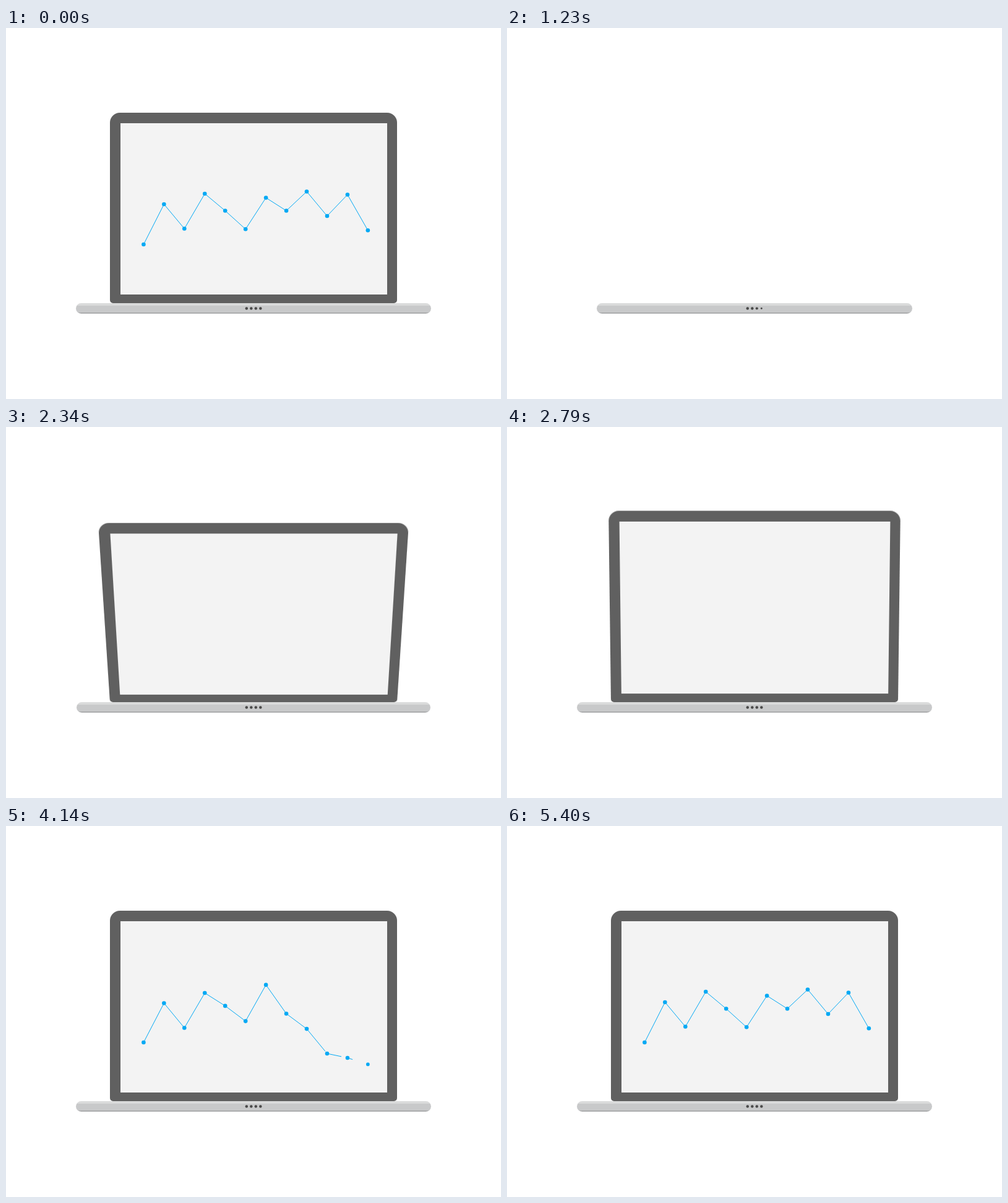
Animation, 800 px wide and 600 px high, one loop 5430 ms. Source, as an HTML page:

```html
<!DOCTYPE html>
<html lang="en">
<head>
<meta charset="utf-8">
<title>Laptop with line chart</title>
<style>
  html, body { margin: 0; width: 100%; height: 100%; overflow: hidden; background: #fff; }
  #stage {
    position: relative; width: 800px; height: 600px; overflow: hidden;
    perspective: 1725px; perspective-origin: 400px 300px;
  }
  #lid {
    position: absolute; left: 168px; top: 137px; width: 464px; height: 308px;
    background: #606060; border-radius: 16px 16px 5px 5px;
    transform-origin: 50% 100%;
  }
  #screen { position: absolute; left: 16.5px; top: 17px; width: 431px; height: 276.5px; background: #f3f3f3; }
  #base {
    position: absolute; top: 444.5px; height: 17.5px; border-radius: 8.5px;
    background: linear-gradient(#dadbdb 4px, #c8c9ca 4px, #c8c9ca 14.5px, #acadae 14.5px);
  }
  svg { position: absolute; left: 0; top: 0; }
  #ports { fill: #4a4a4a; }
  #lines { stroke: #03a9f4; stroke-width: 1; }
  #dots { fill: #03a9f4; }
</style>
</head>
<body>
<div id="stage">
  <div id="lid"><div id="screen"></div></div>
  <div id="base"></div>
  <svg width="800" height="600">
    <g id="ports"></g>
    <g id="lines"></g>
    <g id="dots"></g>
  </svg>
</div>
<script>
const LOOP = 5430, HOLD = 600, STEP = 30, STAGGER = 90;
const BASE_START = 593, PORT_START = 918, LID_START = 1972, CHART_START = 3060;
const FLOOR = 388;
const heights = [350, 285, 324.5, 268, 295.5, 325.3, 274.5, 295.5, 264.5, 304, 269.5, 327.3];

// Curves sampled once per stagger interval
const rise = [0, .042, .11, .238, .485, .913, 1.155, 1.155, 1.05, .983, .969, .985, 1, 1.003, 1];
const grow = [0, 0, .25, .7, .91, .98, 1];

const $ = id => document.getElementById(id);

function add(parent, tag) {
  const el = document.createElementNS('http://www.w3.org/2000/svg', tag);
  return $(parent).appendChild(el);
}

function set(el, attrs) {
  for (const k in attrs) el.setAttribute(k, attrs[k]);
}

const ports = [0, 1, 2, 3].map(() => add('ports', 'circle'));
const dots = heights.map(() => add('dots', 'circle'));
const lines = heights.slice(1).map(() => add('lines', 'line'));

// Catmull-Rom through evenly spaced samples
function sample(curve, age) {
  const x = age / STAGGER, last = curve.length - 1;
  if (x <= 0) return curve[0];
  if (x >= last) return curve[last];
  const i = Math.floor(x), f = x - i;
  const [a, b, c, d] = [-1, 0, 1, 2].map(o => curve[Math.min(last, Math.max(0, i + o))]);
  return b + f / 2 * (c - a + f * (2 * a - 5 * b + 4 * c - d + f * (3 * (b - c) + d - a)));
}

// Exponential ease-out over two seconds
const expoOut = age => age <= 0 ? 0 : age >= 2000 ? 1 : 1 - 2 ** (-age / 200);

// Quick pop for circles
const pop = age => age <= -10 ? 0 : 1 - Math.exp(-(age + 10) / 50);

function draw(t) {
  const half = 287 * expoOut(t - BASE_START);
  $('base').style.left = 400 - half + 'px';
  $('base').style.width = 2 * half + 'px';

  ports.forEach((p, i) => set(p, {
    cx: 388.8 + 7.5 * i, cy: 453.5, r: 2.25 * pop(t - PORT_START - STAGGER * i)
  }));

  const angle = 90 * (1 - expoOut(t - LID_START));
  $('lid').style.visibility = t < LID_START ? 'hidden' : 'visible';
  $('lid').style.transform = angle ? `rotateX(${-angle}deg)` : 'none';

  const points = heights.map((h, i) => {
    const age = t - CHART_START - STAGGER * i;
    return { age, x: 222.4 + 32.95 * i, y: FLOOR + (h - FLOOR) * sample(rise, age) };
  });
  points.forEach((p, i) => {
    set(dots[i], { cx: p.x, cy: p.y, r: 3.3 * pop(p.age) });
    if (!lines[i]) return;
    const q = points[i + 1], f = sample(grow, p.age);
    set(lines[i], {
      x1: p.x, y1: p.y,
      x2: p.x + (q.x - p.x) * f, y2: p.y + (q.y - p.y) * f,
      visibility: f > 0 ? 'visible' : 'hidden'
    });
  });
}

const start = performance.now();
function tick() {
  const t = (performance.now() - start) % LOOP;
  draw(t < HOLD ? LOOP : Math.floor(t / STEP) * STEP);
  requestAnimationFrame(tick);
}
tick();
</script>
</body>
</html>
```
